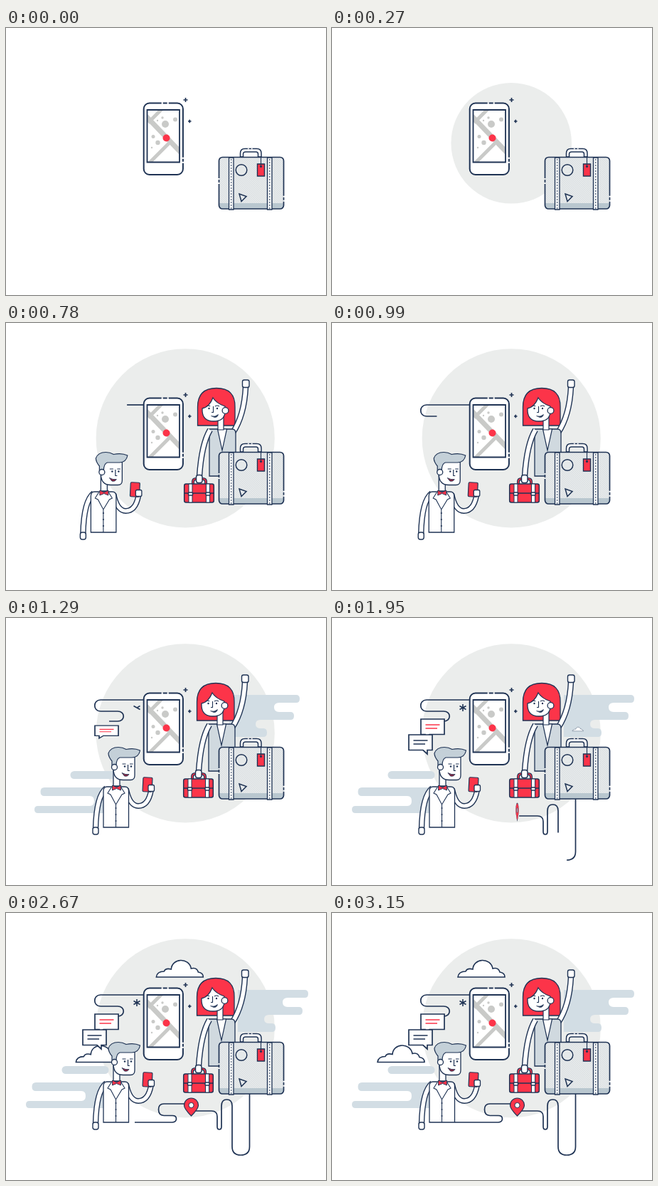
These frames come from a looping animation (450 px wide and 375 px high, 3600 ms). An HTML page with a canvas:

```html
<!DOCTYPE html>
<html lang="en">
<head>
<meta charset="utf-8">
<title>Travel concierge</title>
<style>
html, body { margin: 0; width: 100%; height: 100%; overflow: hidden; background: #fff; }
canvas { display: block; width: 450px; height: 375px; }
</style>
</head>
<body>
<canvas id="stage"></canvas>
<script>
const LOOP = 3600, STEP = 30, LAST = 3150;
const NAVY = '#1f3354', RED = '#fc3449', WHITE = '#fff', DISC = '#ebedec';
const MIST = '#d2dde4', HAIR = '#c4d0d8', JACKET = '#d0d9df', ROAD = '#c9cac8';

const canvas = document.getElementById('stage');
const ratio = window.devicePixelRatio || 1;
canvas.width = 450 * ratio;
canvas.height = 375 * ratio;
const c = canvas.getContext('2d');

// timing helpers
const clamp = v => Math.max(0, Math.min(1, v));
const part = (t, start, length) => clamp((t - start) / length);
const left = (t, start, length, power = 3) => Math.pow(1 - part(t, start, length), power);

// drawing helpers
function paint(path, fill, line = NAVY, width = 1.5, dash = []) {
  if (fill) { c.fillStyle = fill; c.fill(path); }
  if (!line) return;
  c.strokeStyle = line;
  c.lineWidth = width;
  c.setLineDash(dash);
  c.stroke(path);
  c.setLineDash([]);
}
const shape = (d, ...style) => paint(new Path2D(d), ...style);

function box(x, y, w, h, r, ...style) {
  const p = new Path2D();
  p.roundRect(x, y, w, h, r);
  paint(p, ...style);
}
function dot(x, y, r, ...style) {
  const p = new Path2D();
  p.arc(x, y, r, 0, 7);
  paint(p, ...style);
}
function limb(d, width = 7) {
  shape(d, null, NAVY, width + 1.4);
  shape(d, null, WHITE, width - 1.4);
}
function group(x, y, sx, sy, alpha, draw) {
  if (alpha <= 0 || sx <= 0 || sy <= 0) return;
  c.save();
  c.translate(x, y);
  c.scale(sx, sy);
  c.globalAlpha = alpha;
  draw();
  c.restore();
}

// a line that can be drawn up to a share of its length
function trace(d) {
  const el = document.createElementNS('http://www.w3.org/2000/svg', 'path');
  el.setAttribute('d', d);
  const path = new Path2D(d), size = el.getTotalLength();
  return (share, width = 1.7) => {
    if (share > 0) paint(path, null, NAVY, width, share < 1 ? [size * share, size + 9] : []);
  };
}

const wire = trace('M194 115H133C122 115 122 131 133 131H157C168 131 168 145 157 145H145');
const roadDown = trace('M342.5 254V328Q342.5 340 330 340');
const roadUp = trace('M263 278H289Q297 278 297 286V300Q297 304 300 304T303 300V271Q303 262 310.5 262T318 271V328Q318 340 330 340');
const roadLeft = trace('M262 278Q260 268 250 268H222Q214.5 268 214.5 276T222 284.5H234Q239.5 284.5 239.5 289T234 294H173');
const starArms = ['M179.5 123.5L188.5 128.5', 'M188.5 123.5L179.5 128.5', 'M184 121V131'].map(trace);

function streaks(t) {
  if (t < 1080) return;
  const off = 53 * left(t, 1065, 576);
  const alpha = part(t, 1065, 150);
  group(-off, 0, 1, 1, alpha, () => shape(
    'M326 108H420Q425 108 425 113.5T420 119H396Q389 119 389 125.5T396 132H412' +
    'Q417 132 417 137.5T412 143H370Q363 143 363 149T370 155H374Q379 155 379 161T374 167H326Z', MIST, null));
  group(off, 0, 1, 1, alpha, () => {
    box(78.5, 215, 66, 11, 5.5, MIST, null);
    shape('M142 238H42Q36.5 238 36.5 244T42 250H106Q112 250 112 257T106 264H33Q28 264 28 269T33 274H142Z', MIST, null);
  });
}

function cloud(x, y, size) {
  group(x, y, size, size, 1, () => shape(
    'M-33 0Q-32 -8 -22 -8Q-20 -13 -12 -11C-11 -27 13 -28 16 -12Q24 -14 26 -7Q33 -6 33 0Z', WHITE, NAVY, 1.6));
}

function clouds(t) {
  if (t > 1890) {
    const rise = left(t, 1890, 700);
    cloud(210 + 146 * left(t, 1890, 1260, 1.5), 90 + 90 * rise, 1 - rise);
  }
  if (t > 2340) {
    const rise = left(t, 2340, 400);
    cloud(97 + 75 * left(t, 2340, 810, 1.5), 209.5 + 12 * rise, 1 - rise);
  }
}

// a speech bubble that unfolds from the tip of its tail
function bubble(x, y, tail, ink, grow) {
  group(x, y + 27 * (1 - grow), 1, grow, 1, () => {
    shape(`M0 0H33V21.5${tail}V21.5H0Z`, WHITE, NAVY, 1.7);
    shape('M6.5 8H26.5M6.5 13H23', null, ink, 1.6);
  });
}

function chat(t) {
  wire(part(t, 715, 400));
  starArms.forEach((arm, i) => arm(part(t, 1200 + i * 60, 70), 1.6));
  bubble(125, 142, 'H12L6 27', RED, 1 - left(t, 1150, 460));
  bubble(108, 164, 'H26V27L20 21.5', NAVY, 1 - left(t, 1600, 330));
}

function road(t) {
  roadDown(1 - left(t, 1500, 210, 2));
  roadUp(part(t, 1710, 315));
  roadLeft(1 - left(t, 2200, 590, 1.8));
  const spin = 1 - left(t, 1890, 330, 1.15);
  group(260.5, 0, spin, 1, t > 1890 ? 1 : 0, () => {
    shape('M0 285Q-10 275 -10 270A10 10 0 0 1 10 270Q10 275 0 285Z', RED, NAVY, 1.2);
    dot(0, 270, 3.6, WHITE, NAVY, 1);
  });
}

function phone() {
  box(193.7, 105.5, 55.2, 100.5, 8, WHITE, NAVY, 2, [17, 2, 6, 2, 93, 2, 4, 2, 999]);
  c.save();
  c.beginPath();
  c.rect(198.5, 115, 45.5, 73.5);
  c.clip();
  shape('M198 115H245V189H198Z', WHITE, null);
  shape('M197 124L246 175', null, ROAD, 7);
  shape('M200 133L220 113M229 162L202 189', null, ROAD, 5);
  [[224, 135, 5], [238, 128.5, 3], [213.5, 161, 3.2], [207, 152.5, 2.5], [220, 126, 1.7], [213, 130, 1.2], [205, 168, 1.2]]
    .forEach(([x, y, r]) => dot(x, y, r, ROAD, null));
  c.restore();
  box(198.5, 115, 45.5, 73.5, 0, null, NAVY, 1.8);
  dot(225.5, 154.5, 5, RED, null);
  shape('M249.5 101H255.5M252.5 98V104M256 131H260.5M258.25 128.75V133.25', null, NAVY, 1.7);
}

function suitcase() {
  shape('M329.5 181V176Q329.5 169.5 336 169.5H352.5Q359 169.5 359 176V181H354.5V177Q354.5 174 351.5 174H337Q333.5 174 333.5 177V181Z',
    WHITE, NAVY, 1.5);
  shape('M340 169.5H341.5M345 169.5H346.5', null, WHITE, 2);
  c.save();
  c.beginPath();
  c.roundRect(299.5, 181.5, 91, 72.5, 5);
  c.clip();
  shape('M299 181H391V255H299Z', '#e5e9ea', null);
  let hatch = '';
  for (let x = 225; x < 392; x += 3) hatch += `M${x} 181l74 74`;
  shape(hatch, null, '#d8dde0', 0.8);
  shape('M299 246H391V255H299Z', '#b9c7cf', null);
  c.restore();
  box(299.5, 181.5, 91, 72.5, 5, null, NAVY, 1.7, [138, 2, 4, 2, 131.5, 2, 4, 2, 999]);
  [313.5, 367.5].forEach(x => {
    box(x, 182, 6.5, 73, 0, '#f3f5f5', NAVY, 1.3);
    shape(`M${x + 3.25} 184V254`, null, NAVY, 0.9, [2, 2]);
  });
  dot(331, 199.5, 7.8, '#e5e9ea', NAVY, 1.5);
  shape('M328 233L338 236.5L331 243.5Z', '#e5e9ea', NAVY, 1.5);
  box(353.5, 191, 10, 17, 0, RED, NAVY, 1.4);
  shape('M358.5 180V194', null, NAVY, 1.1);
  dot(358.5, 194.5, 1.6, NAVY, null);
}

function briefcase() {
  const handle = 'M262 226V223Q262 219 266 219H276Q280 219 280 223V226';
  shape(handle, null, NAVY, 4);
  shape(handle, null, RED, 1.6);
  box(249.7, 226, 41.6, 26, 2.5, RED, NAVY, 1.5);
  shape('M249.5 239H291.5', null, NAVY, 1.6);
  [256, 280.5].forEach(x => {
    box(x, 226, 5, 26, 0, WHITE, NAVY, 1);
    box(x - 0.5, 238, 6, 4, 1, WHITE, NAVY, 1.5);
  });
}

function woman() {
  shape('M268.500 144V118Q268.500 91.500 295 91.500T321 118V144Z', RED, NAVY, 1.3);
  limb('M318 154Q334 130 336 90');
  shape('M285 149H317Q322 149 322 155V215H285Z', JACKET, NAVY, 1.3);
  shape('M296.500 149L303 179L309.500 149Z', WHITE, NAVY, 1.2);
  shape('M297 130V150H305V130Z', WHITE, NAVY, 1.2);
  limb('M286 150Q274 170 271 215');
  box(331.5, 80, 9.5, 10.5, 2.5, WHITE, NAVY, 1.4);
  shape('M275 120Q285 118 290 105Q295 113 307 117V125Q306 138 291 138Q276 138 275 124Z', WHITE, NAVY, 1.3);
  dot(307.5, 123, 4.4, WHITE, NAVY, 1.3);
  dot(284.5, 120, 1.2, NAVY, null);
  dot(296, 120, 1.2, NAVY, null);
  shape('M281 117Q284 115 286 117M293 117Q296 115 299 117M290.500 117V125.500H288', null, NAVY, 1.1);
  shape('M287.500 130.500Q293 132.500 297.500 128.500Q296.500 133 292 132.500Z', NAVY, NAVY, 0.6);
  briefcase();
  box(266.5, 213.5, 8.5, 11, 3, WHITE, NAVY, 1.4);
}

function man() {
  shape('M151 207V236H160V220Z', WHITE, NAVY, 1.3);
  limb('M141 239Q127 250 126 296');
  limb('M169 240Q174 264 186 264Q200 264 204 242', 6.5);
  shape('M142 237H167Q172.5 237 172.5 243V294H137V243Q137 237 142 237Z', WHITE, NAVY, 1.3);
  shape('M148 238L143 246L147 248L154.500 262L163 248L167 246L162 238M154.500 262V294', null, NAVY, 1.1);
  [267, 276, 285].forEach(y => dot(154.5, y, 1.1, NAVY, null));
  shape('M149.500 235L155.500 238L161.500 235V242L155.500 239.500L149.500 242Z', RED, NAVY, 0.9);
  box(122, 294, 8, 10, 3, WHITE, NAVY, 1.4);
  shape('M151 193H181V221Q181 227.500 175 227.500H165Q151 227.500 151 212Z', WHITE, NAVY, 1.3);
  shape('M149 208V201Q144 195 144 190Q147 181.500 158 181.500Q164 181.500 169 184.500Q180 182 188.500 186Q187 195.500 177 196H160Q155 198 155 207Z',
    HAIR, NAVY, 1.2);
  dot(152.5, 209.5, 4, WHITE, NAVY, 1.3);
  dot(167, 208.5, 1.2, NAVY, null);
  dot(176, 208.5, 1.2, NAVY, null);
  shape('M163.500 205H168.500M174 205H178.500M171.500 206V214.500H174', null, NAVY, 1.2);
  shape('M163 217.500Q168 220.500 173 219.500Q171 223 166.500 222Z', '#8c2440', NAVY, 0.8);
  group(199, 234, 1, 1, c.globalAlpha, () => {
    c.rotate(0.05);
    box(-6.5, -10, 13, 20, 1.5, RED, NAVY, 1.2);
  });
  box(200, 234.5, 8.5, 9, 2, WHITE, NAVY, 1.3);
}

function draw(t) {
  c.setTransform(ratio, 0, 0, ratio, 0, 0);
  c.globalAlpha = 1;
  c.fillStyle = WHITE;
  c.fillRect(0, 0, 450, 375);
  const grow = 1 - left(t, 120, 480);
  if (grow > 0) dot(252.2, 161.8, 125.6 * grow, DISC, null);
  streaks(t);
  clouds(t);
  chat(t);
  road(t);
  phone();
  group(100 * left(t, 328, 576), 0, 1, 1, part(t, 328, 200), woman);
  suitcase();
  group(-100 * left(t, 527, 576), 0, 1, 1, part(t, 527, 200), man);
}

let start = null;
function tick(now) {
  if (start === null) start = now;
  const t = Math.floor(((now - start) % LOOP) / STEP + 0.01) * STEP;
  draw(Math.min(t, LAST));
  requestAnimationFrame(tick);
}
draw(0);
requestAnimationFrame(tick);
</script>
</body>
</html>
```
